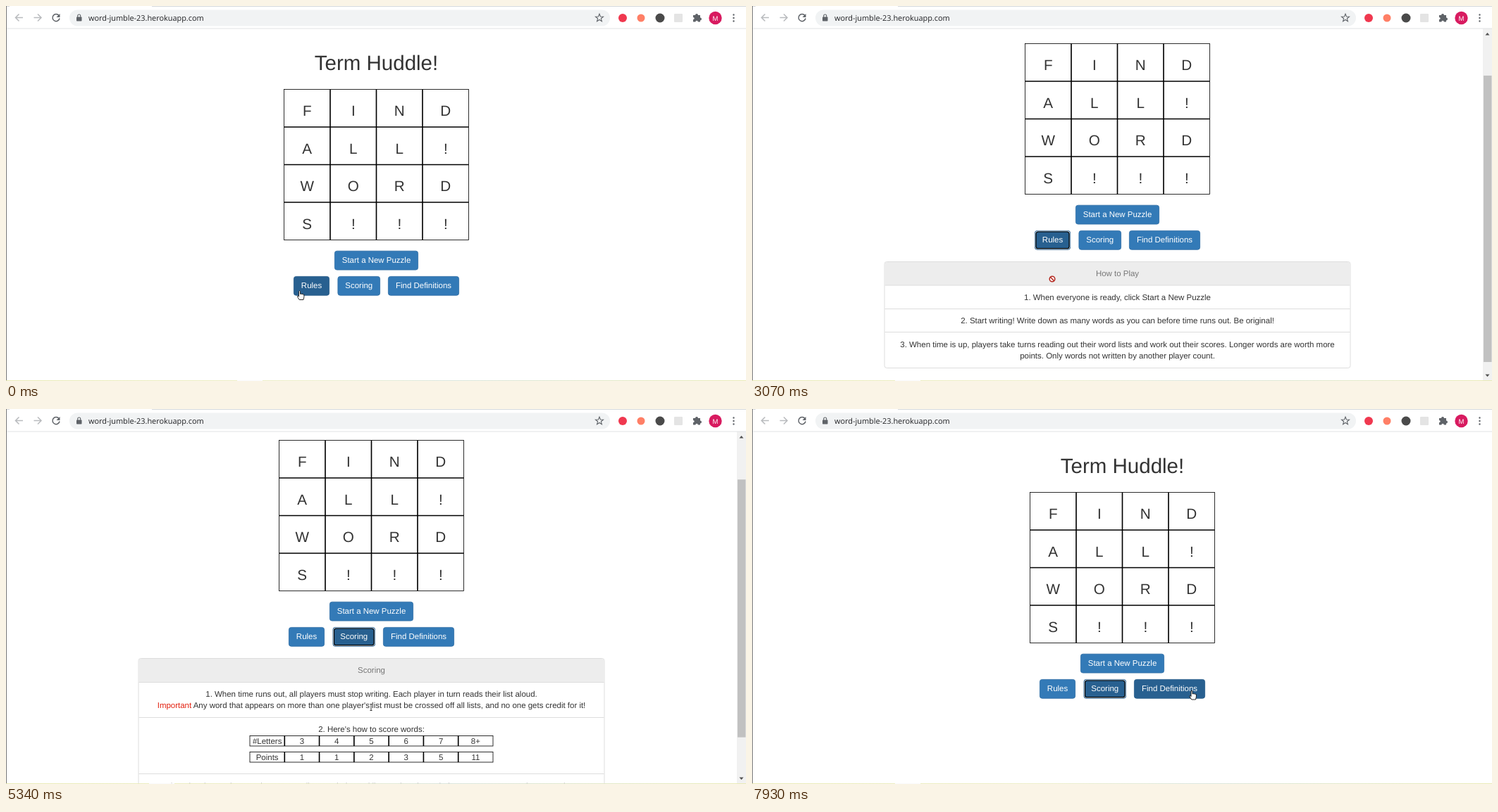
Recreate the animation shown at these times as an HTML page. Size 1050 px wide and 533 px high, loop 8000 ms.

```html
<!DOCTYPE html>
<html lang="en">
<head>
<meta charset="utf-8">
<title>Word puzzle</title>
<style>
  html, body { margin: 0; width: 100%; height: 100%; overflow: hidden; background: #fff; }
  svg { display: block; }
  text { font: 11.48px "Liberation Sans", Arial, sans-serif; fill: #333; white-space: pre; text-rendering: geometricPrecision; }
  .mid { text-anchor: middle; }
  .title { font-size: 29.5px; }
  .letter { font-size: 20.7px; }
  .url { font: 10.9px "Open Sans", "Noto Sans", sans-serif; fill: #202124; }
  .button text { fill: #fff; }
  .button .face { fill: #337ab7; stroke: #2e6da4; }
  .button.dark .face { fill: #286090; stroke: #255a88; }
  .button .ring { display: none; fill: none; }
  .button.focus .ring { display: inline; }
  .icon { fill: none; stroke: #5f6368; stroke-width: 1.5; }
  .thin { stroke-width: 1.1; }
  .off { stroke: #b9bbbe; }
  .grid { fill: none; stroke: #000; }
  .head { fill: #777; }
</style>
</head>
<body>
<svg id="stage" width="1050" height="533" viewBox="0 0 1050 533">
  <defs>
    <clipPath id="view"><rect y="32" width="1050" height="500"/></clipPath>
    <clipPath id="fold"><rect id="foldBox" x="-332" y="428" width="664" height="0"/></clipPath>
    <linearGradient id="edge">
      <stop offset="0" stop-color="#e9eab5"/><stop offset=".4" stop-color="#edeec8"/>
      <stop offset=".6" stop-color="#dbe6dc"/><stop offset="1" stop-color="#e9eab5"/>
    </linearGradient>
  </defs>
  <g clip-path="url(#view)">
    <g id="page">
      <g clip-path="url(#fold)"><g id="rules"/><g id="scoring"/></g>
    </g>
    <g id="bar">
      <rect x="1037" y="32" width="13" height="500" fill="#f1f1f1"/>
      <rect id="thumb" x="1038" width="11.5" fill="#c1c1c1"/>
      <path id="up" d="M1040.5 41.5h6l-3-3.5z"/>
      <path id="down" d="M1040.5 523.5h6l-3 3.5z"/>
    </g>
  </g>

  <g id="toolbar">
    <path d="M0 .5H5M207 .5H1050" stroke="#d5d8dc"/>
    <path d="M0 32H1050" stroke="#e0e2e4"/>
    <path d="M.5 0V533" stroke="#777"/>
    <rect x="90" y="5.5" width="767" height="23" rx="11.5" fill="#f1f3f4"/>
    <path class="icon off" d="M24 16.5H14M18.5 11.5l-5 5 5 5M39.5 16.5h10M45 11.5l5 5-5 5"/>
    <path class="icon" d="M75 13.5a5 5 0 1 0 1 4"/>
    <path d="M76.5 11v5h-5z" fill="#5f6368"/>
    <rect x="100" y="15.5" width="7.5" height="6" rx=".8" fill="#5f6368"/>
    <path class="icon thin" d="M101.7 16v-2a2 2 0 0 1 4 0v2"/>
    <path id="star" class="icon thin"/>
    <circle cx="875" cy="17" r="6" fill="#f0384f"/>
    <circle cx="901" cy="17" r="5.5" fill="#ff7f66"/>
    <circle cx="928" cy="17" r="6.5" fill="#4a4a4a"/>
    <rect x="948" y="11" width="12" height="12" rx="1" fill="#e4e4e4"/>
    <path fill="#5f6368" d="M975 13h3a2 2 0 0 1 4 0h3v3.5a2 2 0 0 1 0 4v2h-3.2a1.7 1.7 0 0 0-3.4 0H975v-3.2a1.7 1.7 0 0 0 0-3.4z"/>
    <circle cx="1006.5" cy="17" r="9.2" fill="#d81b60"/>
    <text class="mid" x="1006.5" y="20.5" style="font-size:9.5px;fill:#fff">M</text>
    <path d="M1032.5 12.5v.01M1032.5 17v.01M1032.5 21.5v.01" stroke="#5f6368" stroke-width="2.4" stroke-linecap="round"/>
    <text class="url" x="117" y="20.8">word-jumble-23.herokuapp.com</text>
  </g>
  <rect y="532" width="1050" height="1" fill="url(#edge)"/>
  <rect id="gap" y="532" width="36" height="1" fill="#fafafa"/>

  <g id="cursor">
    <path id="hand" fill="#fff" stroke="#111" stroke-width=".9" stroke-linejoin="round"
      d="M-1 1Q0-.6 1 1V5l1.3-.5 1 .6 1.3-.3.8.9 1 .2V9L5.5 13H-.3L-3 8.800Q-3.3 7.4-2 7.5L-1 8.6z"/>
    <path id="arrow" fill="#111" stroke="#fff" stroke-width=".7" d="M0 0V8.500L2 6.800 3.500 10.300 5 9.700 3.500 6.300H6z"/>
    <path id="beam" fill="none" stroke="#222" stroke-width=".9" d="M-1.500-4.500h3M0-4.500v9M-1.500 4.500h3"/>
    <g id="no" fill="#fff" stroke="#b3261e" stroke-width="1.5">
      <circle r="3.8"/><path d="M-2.700-2.700 2.700 2.700"/>
    </g>
  </g>
</svg>
<script>
const LOOP = 8000, TOP = 32.5, BOTTOM = 532.5, FOLD_TOP = 428.5, TAIL = 18;
const $ = id => document.getElementById(id);

function add(parent, tag, attrs, text) {
  const el = document.createElementNS('http://www.w3.org/2000/svg', tag);
  for (const k in attrs) el.setAttribute(k, attrs[k]);
  if (text) el.textContent = text;
  parent.appendChild(el);
  return el;
}
const label = (parent, x, y, text, cls = '') =>
  add(parent, 'text', { x, y, class: 'mid ' + cls }, text);

// Thin outer frame, dividers twice as heavy; all x are relative to the page centre.
function table(parent, x, y, w, h, rows, baseline, cls) {
  const cols = rows[0].length, cw = w / cols, rh = h / rows.length;
  let inner = '';
  for (let c = 1; c < cols; c++) inner += `M${x + c * cw} ${y}v${h}`;
  for (let r = 1; r < rows.length; r++) inner += `M${x} ${y + r * rh}h${w}`;
  add(parent, 'rect', { x, y, width: w, height: h, class: 'grid', 'stroke-width': .82 });
  add(parent, 'path', { d: inner, class: 'grid', 'stroke-width': 1.64 });
  rows.forEach((row, r) => row.forEach((s, c) =>
    label(parent, x + (c + .5) * cw, y + r * rh + baseline, s, cls)));
}

const page = $('page');
label(page, 0, 91, 'Term Huddle!', 'title');
table(page, -131, 118.5, 262, 214, ['FIND', 'ALL!', 'WORD', 'S!!!'].map(s => [...s]), 37.6, 'letter');

const buttons = [
  ['Start a New Puzzle', -59.5, 347.8, 119],
  ['Rules', -117.5, 384, 51],
  ['Scoring', -55, 384, 60.5],
  ['Find Definitions', 16.5, 384, 101]
].map(([text, x, y, w]) => {
  const el = add(page, 'g', { class: 'button' });
  const box = (inset, attrs) => add(el, 'rect', {
    x: x + inset, y: y + inset, width: w - 2 * inset, height: 27.7 - 2 * inset, rx: 3.3, ...attrs });
  box(.4, { class: 'face', 'stroke-width': .8 });
  box(1.1, { class: 'ring', stroke: '#fff', 'stroke-width': .8 });
  box(2, { class: 'ring', stroke: '#000', 'stroke-width': 1.2 });
  label(el, x + w / 2, y + 17.4, text);
  return { el, x, y, w };
});

function panel(parent, title, dividers) {
  const end = dividers[dividers.length - 1];
  add(parent, 'rect', { x: -330.5, y: FOLD_TOP, width: 661, height: end - FOLD_TOP, rx: 3.3, fill: '#fff', stroke: '#ddd' });
  add(parent, 'path', { d: 'M-330 462V432q0-3 3-3H327q3 0 3 3V462z', fill: '#ededed' });
  dividers.slice(0, -1).forEach(y => add(parent, 'path', { d: `M-330 ${y}H330`, stroke: '#ddd' }));
  label(parent, 0, 449, title, 'head');
}
function lastItem(parent, y) {
  label(parent, 0, y, '3. When time is up, players take turns reading out their word lists and work out their scores. Longer words are worth more');
  label(parent, 0, y + 16.4, 'points. Only words not written by another player count.');
}
const rules = $('rules'), scoring = $('scoring');
panel(rules, 'How to Play', [462, 495.5, 528.5, 579.5]);
label(rules, 0, 482.7, '1. When everyone is ready, click Start a New Puzzle');
label(rules, 0, 516.2, '2. Start writing! Write down as many words as you can before time runs out. Be original!');
lastItem(rules, 550);

panel(scoring, 'Scoring', [462.5, 512.5, 592.5, 643.5]);
label(scoring, 0, 483.1, '1. When time runs out, all players must stop writing. Each player in turn reads their list aloud.');
const warning = label(scoring, 0, 499.4, '');
add(warning, 'tspan', { fill: '#e3200f' }, 'Important');
add(warning, 'tspan', {}, " Any word that appears on more than one player's list must be crossed off all lists, and no one gets credit for it!");
label(scoring, 0, 533.4, "2. Here's how to score words:");
table(scoring, -172.5, 538.5, 345, 14.5, [['#Letters', '3', '4', '5', '6', '7', '8+']], 11.8);
table(scoring, -172.5, 561.5, 345, 14.5, [['Points', '1', '1', '2', '3', '5', '11']], 11.8);
lastItem(scoring, 613.5);

$('star').setAttribute('d', 'M' + Array.from({ length: 10 }, (_, i) => {
  const a = i * Math.PI / 5, r = i % 2 ? 2.5 : 5.8;
  return `${842 + r * Math.sin(a)} ${17 - r * Math.cos(a)}`;
}).join('L') + 'z');

// Bursts of screen updates: first, last, count.
const bursts = [
  [220, 270, 2], [670, 1130, 7], [1450, 1990, 8], [2220, 2300, 2], [2450, 2620, 3],
  [2770, 2770, 1], [3000, 3470, 7], [3630, 4080, 7], [4250, 5020, 11], [5250, 5420, 3],
  [5730, 5730, 1], [6180, 6350, 3], [6580, 6660, 2], [6890, 7680, 11], [7780, 7930, 3]
];
function snap(t) {
  let shown = 0;
  for (const [a, b, n] of bursts) {
    if (t < a) break;
    const step = (b - a) / (n - 1) || 1;
    shown = a + step * Math.min(n - 1, Math.floor((t - a) / step + .25));
  }
  return shown;
}

// Time, x, y and, where it does not follow from the page, the pointer shape.
const pointer = [
  [0, 416.5, 404.5], [200, 416.5, 404.5], [270, 388, 519], [640, 388, 519],
  [980, 425, 402], [1130, 431.5, 393], [2220, 431.5, 393, 'hand'], [2300, 430, 396, 'hand'],
  [2769, 430, 396, 'hand'], [2770, 426, 388, 'no'], [3090, 426, 388], [3400, 430, 397],
  [4200, 430, 397], [4480, 516.5, 394], [4660, 516.5, 394], [4950, 518, 424],
  [5240, 518, 424, 'beam'], [5729, 518, 424, 'beam'], [5730, 517.5, 423, 'arrow'], [6130, 517.5, 423, 'arrow'],
  [6350, 494, 340], [6530, 494, 340], [6660, 497.5, 317], [6890, 497.5, 317],
  [6940, 497.5, 317, 'arrow'], [7250, 497.5, 317], [7680, 637, 395], [7750, 637, 395], [7930, 624, 400]
];
const wheel = [
  [2400, 0], [2450, 28], [2535, 75], [2620, 82], [2970, 82], [3000, 77], [3078, 65], [3157, 32], [3235, 7], [3310, 0],
  [5200, 0], [5250, 28], [5335, 74], [5420, 82], [7250, 82], [7300, 0]
];
function track(keys, t) {
  if (t <= keys[0][0]) return keys[0];
  const i = keys.findIndex(k => k[0] > t);
  if (i < 0) return keys[keys.length - 1];
  const a = keys[i - 1], b = keys[i], f = (t - a[0]) / (b[0] - a[0]);
  return a.map((v, j) => typeof v === 'number' ? v + (b[j] - v) * f : v);
}

// CSS "ease" over the 350 ms height transition.
function ease(x) {
  if (x <= 0) return 0;
  if (x >= 1) return 1;
  let lo = 0, hi = 1, s;
  for (let i = 0; i < 20; i++) {
    s = (lo + hi) / 2;
    if (.75 * s * (1 - s) + s ** 3 < x) lo = s; else hi = s;
  }
  return .3 * (1 - s) ** 2 * s + 3 * (1 - s) * s * s + s ** 3;
}
const unfold = (t, open, close) => ease((t - open) / 350) - ease((t - close) / 350);
const show = (el, on) => el.setAttribute('display', on ? 'inline' : 'none');

function draw(now) {
  const t = snap(now % LOOP);
  const first = t < 4300;
  const height = first ? 167 * unfold(t, 1540, 3680) : 231.5 * unfold(t, 4600, 6947);
  const overflow = Math.max(0, FOLD_TOP + height + TAIL - BOTTOM);
  const scroll = Math.round(Math.min(track(wheel, t)[1], overflow));
  const centre = overflow ? 518.5 : 525.5;

  page.setAttribute('transform', `translate(${centre} ${-scroll})`);
  $('foldBox').setAttribute('height', height ? height + .5 : 0);
  show(rules, first);
  show(scoring, !first);

  show($('bar'), overflow > 0);
  const view = BOTTOM - TOP, rail = 473 / (view + overflow);
  $('thumb').setAttribute('y', 46 + scroll * rail);
  $('thumb').setAttribute('height', view * rail);
  $('up').setAttribute('fill', scroll > 0 ? '#505050' : '#a3a3a3');
  $('down').setAttribute('fill', scroll < overflow - 1 ? '#505050' : '#a3a3a3');

  const [, x, y, shape] = track(pointer, t);
  const focused = t < 1450 ? -1 : t < 4550 ? 1 : 2;
  let over = false;
  buttons.forEach((b, i) => {
    const px = x - centre - b.x, py = y + scroll - b.y;
    const hover = px > 0 && px < b.w && py > 0 && py < 28;
    over = over || hover;
    b.el.classList.toggle('dark', hover || i === focused);
    b.el.classList.toggle('focus', i === focused);
  });
  const kind = shape || (over ? 'hand' : 'arrow');
  for (const id of ['hand', 'arrow', 'beam', 'no']) show($(id), id === kind);
  $('cursor').setAttribute('transform', `translate(${x} ${y})`);
  $('gap').setAttribute('x', t < 1450 ? 328 : 203);
}

const start = performance.now();
function tick() {
  draw(performance.now() - start);
  requestAnimationFrame(tick);
}
tick();
</script>
</body>
</html>
```
